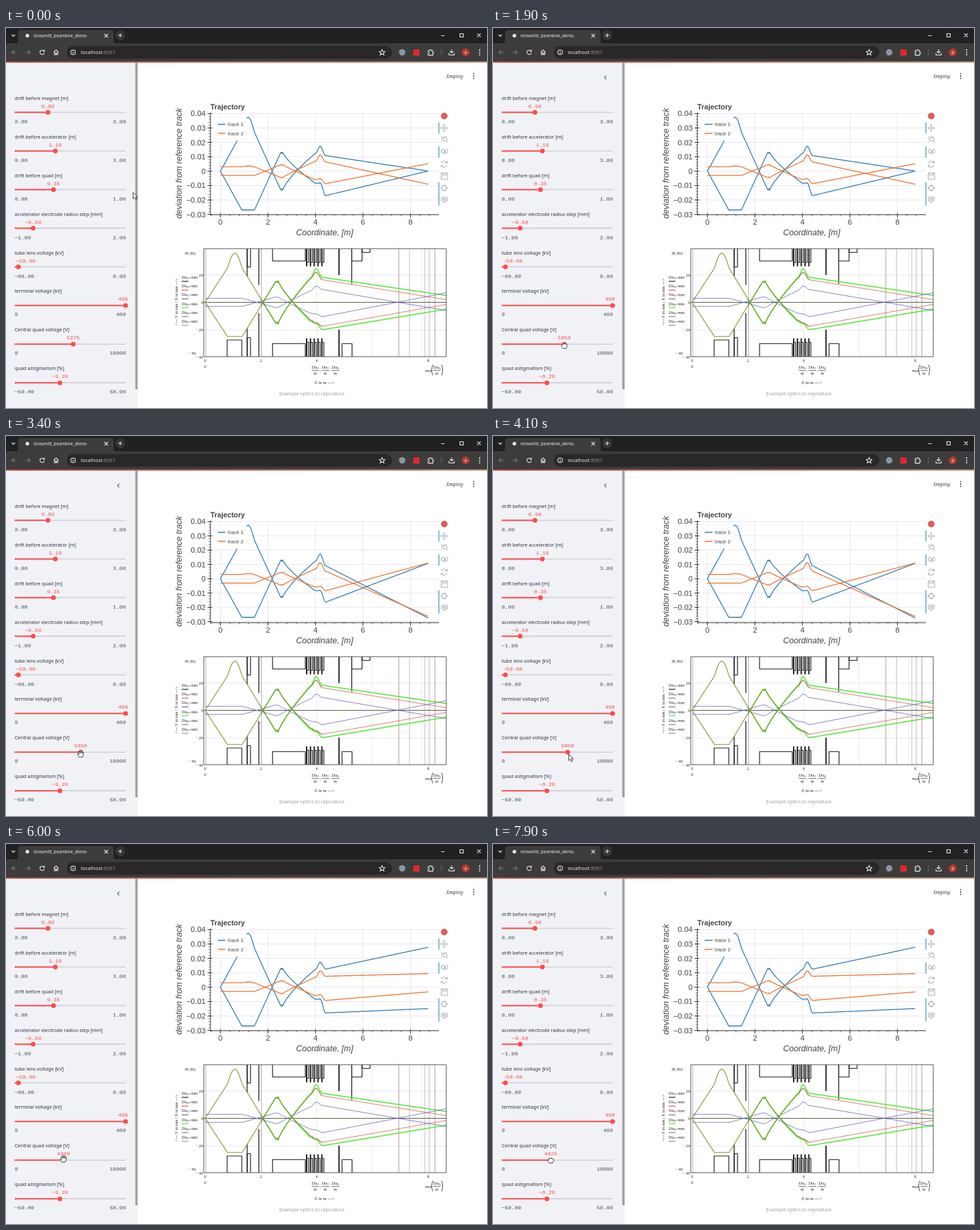
These frames come from a looping animation (720x570 px, 8 s). An HTML page:

```html
<!DOCTYPE html>
<html lang="en">
<head>
<meta charset="utf-8">
<title>Beamline demo</title>
<style>
html, body { margin: 0; width: 100%; height: 100%; overflow: hidden; background: #fff; }
svg { display: block; width: 720px; height: 570px; }
text { font-family: "Noto Sans", sans-serif; fill: #31333f; }
.ln { fill: none; stroke-linejoin: round; }
.ico { fill: none; stroke: #e8e8e8; stroke-width: 1.1; }
.dim { stroke: #7c7c7c; }
.label { font-size: 7.25px; }
.mono { font: 8.1px "Liberation Mono", monospace; fill: #4c4e5a; }
.val { fill: #ff4b4b; text-anchor: middle; }
.plot text { font-family: "Liberation Sans", sans-serif; fill: #444; }
.tool { fill: none; stroke: #a8a8b4; }
.optics text { font: 6.2px "Liberation Serif", serif; fill: #222; }
.mid { text-anchor: middle; }
.end { text-anchor: end; }
</style>
</head>
<body>
<svg viewBox="0 0 720 570">
  <defs>
    <linearGradient id="bar"><stop stop-color="#c8423c"/><stop offset="1" stop-color="#b89070"/></linearGradient>
    <clipPath id="frame"><path d="M296 331H659V493H296z"/></clipPath>
  </defs>

  <g id="browser">
    <rect width="720" height="24" fill="#202122"/>
    <path d="M13 24q5 0 5-5V8q0-5 5-5H156q5 0 5 5v11q0 5 5 5z" fill="#3c3c3c"/>
    <rect y="23" width="720" height="27" fill="#3c3c3c"/>
    <rect x="91" y="27" width="487" height="19" rx="9.5" fill="#282828"/>
    <rect y="50" width="720" height="2" fill="url(#bar)"/>
    <circle cx="32" cy="11.5" r="2.7" fill="#e8e8e8"/>
    <circle cx="171" cy="11" r="7.5" fill="#343434"/>
    <g class="ico">
      <path d="M8.500 10l2.500 2.500 2.500-2.500M147.500 9l5 5m0-5l-5 5M168 11h6m-3-3v6M651.500 11.500h5M679.500 8.500h5v5h-5zM705.500 8.500l5 5m0-5l-5 5"/>
      <path class="dim" d="M16 36.500H9m3-3l-3 3 3 3M29 36.500h7m-3-3l3 3-3 3"/>
      <path d="M56.800 34.500a3.300 3.300 0 1 0 .5 3M57.500 32.500v2.500h-2.500M71.500 36.500l3.500-3.500 3.500 3.500M72.500 36v4h1.800v-2.500h1.500V40h1.700v-4"/>
      <circle cx="100.500" cy="36.500" r="3.500"/><path d="M100.500 36v2.500m0-4v.8"/>
      <path d="M563 32.300l1.200 2.800 3 .3-2.300 2 .8 3-2.700-1.700-2.700 1.700.8-3-2.300-2 3-.3z"/>
      <path d="M632 34h2a1.300 1.300 0 1 1 2.700 0h2v2.200a1.300 1.300 0 1 1 0 2.700v2H632v-2.300a1.200 1.200 0 1 0 0-2.400z"/>
      <path d="M667 32v5.500m-2.500-2.500l2.500 2.500 2.500-2.500M663 37.500v3h8v-3"/>
    </g>
    <path d="M651.500 32v9" stroke="#666"/>
    <circle cx="593" cy="36.500" r="4.800" fill="#8a94a6"/>
    <rect x="609.500" y="32" width="9.500" height="9.500" rx="1" fill="#e0282c"/>
    <circle cx="688" cy="36.500" r="5.800" fill="#c0392b"/>
    <text x="688" y="38.800" class="mid" style="font-size:6.500px;fill:#fff">a</text>
    <text x="41" y="14" style="font-size:6.600px;fill:#eee">streamlit_beamline_demo</text>
    <text x="112" y="39.300" style="font-size:7.700px;fill:#eee">localhost<tspan fill="#999">:8501</tspan></text>
    <path d="M709 32.100v9" stroke="#e8e8e8" stroke-width="1.800" stroke-dasharray="1.800"/>
  </g>

  <rect y="52" width="197" height="518" fill="#f0f2f6"/>
  <rect x="193.500" y="52" width="3.500" height="490" fill="#a0a0a4"/>
  <path id="fold" d="M169.500 71.500l-2.700 2.800 2.700 2.800" class="ln" stroke="#555866" stroke-width="1.100"/>
  <g id="sliders"></g>

  <text x="659.500" y="74.800" style="font-size:7.600px">Deploy</text>
  <path d="M700 67.900v8.500" stroke="#31333f" stroke-width="1.700" stroke-dasharray="1.700"/>

  <g class="plot">
    <g id="chart"></g>
    <path d="M306 127V280H648" fill="none" stroke="#333"/>
    <rect x="311" y="135" width="49.500" height="34" fill="#fff"/>
    <path d="M317 144.500h11.500" stroke="#327cb0" stroke-width="1.500"/>
    <path d="M317 158h11.500" stroke="#ec7430" stroke-width="1.500"/>
    <text x="332" y="147" font-size="7.700">trace 1</text>
    <text x="332" y="160.500" font-size="7.700">trace 2</text>
    <text x="306" y="121.500" font-size="10.800" font-weight="bold">Trajectory</text>
    <text x="477" y="310.500" class="mid" font-size="12.500" font-style="italic">Coordinate, [m]</text>
    <text transform="translate(263 203) rotate(-90)" class="mid" font-size="12.550" font-style="italic">deviation from reference track</text>
    <path d="M648 141.500v17M648 177.500v17M648 231.500v35" stroke="#6aa6c0" stroke-width="1.500"/>
    <circle cx="656" cy="132" r="5" fill="#d8605c"/>
    <g class="tool">
      <path d="M651 150h10M656 145v10M652.500 148.500l-1.500 1.500 1.500 1.500M659.500 148.500l1.500 1.500-1.500 1.500M654.500 146.500l1.500-1.500 1.500 1.500M654.500 153.500l1.500 1.500 1.500-1.500"/>
      <path d="M652 172v-9h9" stroke-dasharray="2 1"/><circle cx="657" cy="167" r="3"/><path d="M659 169l2.500 3"/>
      <circle cx="654" cy="185" r="2.700"/><path d="M656 187l2 3"/><rect x="658" y="182" width="3" height="5.500" rx="1.500"/>
      <path d="M652 203a4.200 4.200 0 0 1 8-1M660 205.500a4.200 4.200 0 0 1-8 1M660.500 199.500v3h-3M651.500 209v-3h3"/>
      <path d="M651.500 217.500h9.500v9.500h-9.500zM653.500 217.500v3h5.500v-3"/>
      <circle cx="656" cy="240" r="4"/><path d="M656 234.500v4m0 3v4M650.500 240h4m3 0h4"/>
      <path d="M652 254h8.500v5.500l-3 .5-1.500 2.500-1.500-2.500-2.500-.5zM653.500 256h5.500m-5.500 2h5.500"/>
    </g>
  </g>

  <g class="optics" id="optics"></g>
  <text x="458" y="550.500" class="mid" style="font-size:7.300px;fill:#9a9ba2">Example optics to reproduce</text>

  <g id="cursor" stroke="#151515" stroke-width=".8" fill="#fff" stroke-linejoin="round">
    <path id="arrow" d="M1.700 1.700v9.500l2.200-2 1.600 3.500 1.700-.7-1.600-3.400h3z"/>
    <path id="open" d="M-2.500 5C-3.500 3-5.500 1-4.800.2-4.200-.5-3.200 0-2.500 1L-3.500-2.500C-3.500-4-2-4-1.700-2.800L-1.200-1V-4C-1.200-5.200.4-5.200.5-4V-1L1.200-3.500C1.600-4.700 3-4.200 2.700-3L2.300-.6 3.200-2C4-3 5-2.200 4.600-1.200L3.400 3.200 2.500 5z"/>
    <path id="grab" d="M-2.300 4.500C-3.500 3-4.800 1.500-4.200.2-3.800-.7-3-.4-2.800-.2V-1.500C-2.600-2.700-1.200-2.700-1-1.800-.8-3 .8-3 1-1.800 1.400-2.700 2.700-2.500 2.700-1.300 3.400-1.900 4.400-1.400 4.300-.4 4.400 1.500 3.400 3 2.800 4.500z"/>
  </g>
</svg>
<script>
const LOOP = 8000, STEP = 100, START_VOLTS = 5275;
const BLUE = '#327cb0', ORANGE = '#ec7430', GRID = '#e6e6f2', INK = '#222';
const $ = id => document.getElementById(id);
const text = (x, y, s, extra = '') => `<text x="${x}" y="${y}" ${extra}>${s}</text>`;
const line = (d, color, w = 1) => `<path class="ln" d="${d}" stroke="${color}" stroke-width="${w}"/>`;
const minus = s => String(s).replace('-', '−');
const lerp = (a, b, u) => a + (b - a) * u;
const smooth = u => u * u * (3 - 2 * u);

// Sidebar
const sliders = [
  ['drift before magnet [m]', '0.00', '3.00', '0.90'],
  ['drift before accelerator [m]', '0.00', '3.00', '1.10'],
  ['drift before quad [m]', '0.00', '1.00', '0.35'],
  ['accelerator electrode radius step [mm]', '-1.00', '2.00', '-0.50'],
  ['tube lens voltage [kV]', '-60.00', '0.00', '-58.00'],
  ['terminal voltage [kV]', '0', '460', '460'],
  ['Central quad voltage [V]', '0', '10000', '5275'],
  ['quad astigmatism [%]', '-50.00', '50.00', '-9.20']
];
const knobX = (value, min, max) => 13 + 166 * (value - min) / (max - min);

function slider([label, min, max, value], i) {
  const y = 126.5 + i * 57.95, x = knobX(value, min, max), half = value.length * 2.43;
  const tx = Math.max(15 + half, Math.min(182.5 - half, x));
  return text(13, y - 18.8, label, 'class="label"') +
    text(tx, y - 6.8, minus(value), 'class="mono val"') +
    line(`M13 ${y}H179`, '#cfd0d8', 1.6) + line(`M13 ${y}H${x}`, '#ff4b4b', 2) +
    `<circle cx="${x}" cy="${y}" r="3.5" fill="#ff4b4b"/>` +
    text(13, y + 16.2, minus(min), 'class="mono"') + text(179.5, y + 16.2, minus(max), 'class="mono end"');
}

function drawSliders(volts) {
  sliders[6][3] = String(volts);
  $('sliders').innerHTML = sliders.map(slider).join('');
}

// Ray height in mm at z metres: drift, magnet, lens, quad, drift
const MAGNET = 0.53, LENS = 2.55, LENS_END = 2.62;
function height(ray, z, kick = 0) {
  const { side, start, wide, lens, hump = 0, power, magnet, quad, entry, peak, exit, end, reach } = ray;
  const out = magnet + MAGNET, top = quad + 0.2, leave = quad + 0.43;
  const part = (a, b) => (z - a) / (b - a);
  if (z < magnet) return side * lerp(start, wide, z / magnet);
  if (z < out) return side * wide + hump * Math.sin(Math.PI * part(magnet, out));
  if (z < LENS) return side * lerp(wide, -lens, part(out, LENS));
  if (z < LENS_END) return -side * lens * (1 - 0.09 * Math.sin(Math.PI * part(LENS, LENS_END)));
  if (z < quad) return lerp(-side * lens, entry, part(LENS_END, quad) ** power);
  if (z < top) return lerp(entry, peak, smooth(part(quad, top)));
  const gone = exit + kick / 16;
  if (z < leave) return lerp(peak, gone, smooth(part(top, leave)));
  return lerp(gone, end + kick, part(leave, reach));
}

function sample(ray, from, to, kick) {
  const n = Math.ceil((to - from) / 0.02);
  return Array.from({ length: n + 1 }, (_, i) => {
    const z = lerp(from, to, i / n);
    return [z, height(ray, z, kick)];
  });
}
const curve = (pts, toX, toY) => 'M' + pts.map(([z, v]) => `${toX(z).toFixed(1)} ${toY(v).toFixed(1)}`).join('L');

// Upper plot
const setup = { magnet: 0.9, quad: 4, reach: 8.75 };
const wideRay = { ...setup, color: BLUE, start: 0, wide: 27, lens: 13.4, power: 0.75 };
const thinRay = { ...setup, color: ORANGE, start: 3, wide: 3, lens: 4.5, power: 0.9 };
const rays = [
  { ...wideRay, side: 1, hump: 10.4, entry: 12.4, peak: 17.3, exit: 10.8, end: 0.1, pull: -36.8, bend: -6 },
  { ...wideRay, side: -1, entry: -8.4, peak: -8.2, exit: -17, end: 0.1, pull: 16.4, bend: -0.8 },
  { ...thinRay, side: 1, hump: 0.6, entry: 6.9, peak: 11.3, exit: 6.4, end: -9.1, pull: -23.6, bend: -2.8 },
  { ...thinRay, side: -1, entry: -5.9, peak: -5.2, exit: -8.7, end: 5.2, pull: 9.1, bend: -0.7 }
];

function drawChart(volts) {
  const d = (volts - START_VOLTS) / 1000;
  const data = rays.map(r => sample(r, 0, r.reach, r.pull * d + r.bend * d * d));
  const all = data.flat().map(p => p[1]), hi = Math.max(...all), span = hi - Math.min(...all);
  const toX = z => 321 + z * 35.55;
  const toY = v => 127 + (hi + span * 0.05 - v) * 153 / (span * 1.1);
  let s = '';
  for (let z = 0; z <= 8; z += 2) {
    s += line(`M${toX(z)} 127V280`, GRID) + line(`M${toX(z)} 277.500V284.500`, '#333') +
      text(toX(z), 294.5, z, 'class="mid" font-size="11.5"');
  }
  for (let z = -0.4; z < 9.2; z += 0.4) s += line(`M${toX(z)} 280v2.500`, '#333', 0.7);
  for (let v = -30; v <= 40; v += 10) {
    s += line(`M306 ${toY(v)}H648`, GRID) + line(`M301.500 ${toY(v)}H308.500`, '#333') +
      text(299, toY(v) + 4.1, minus(v ? (v / 1000).toFixed(2) : 0), 'class="end" font-size="11.5"');
  }
  for (let v = -30; v < 40; v += 2) s += line(`M303.500 ${toY(v)}H306`, '#333', 0.7);
  $('chart').innerHTML = s + data.map((pts, i) => line(curve(pts, toX, toY), rays[i].color, 1.3)).join('');
}

// Lower picture
const AXIS = 411.5;
const model = { magnet: 0.8, quad: 3.78, reach: 8.65, start: 0, wide: 25, lens: 15.8, power: 0.8 };
const upper = { ...model, side: 1, hump: 11, entry: 17.5, peak: 22, exit: 16.5, end: 2 };
const lower = { ...model, side: -1, entry: -13, peak: -15, exit: -17.5, end: -1.5 };
const limes = [
  { ...upper, entry: 18, peak: 24.6, exit: 18.3, end: 5 },
  { ...lower, entry: -14, peak: -15.5, exit: -20, end: -5 }
];
const thin = { ...model, start: 3, wide: 3, lens: 4, power: 0.9 };
const navies = [
  { ...thin, side: 1, entry: 8.5, peak: 11.9, exit: 9.4, end: -6 },
  { ...thin, side: -1, entry: -8, peak: -8.5, exit: -10.5, end: 7 }
];

function electrodes() {
  let s = '';
  for (const side of [-1, 1]) {
    const wall = AXIS + side * 82;
    const box = (a, b, gap) => line(`M${a} ${wall}V${AXIS + side * gap}H${b}V${wall}`, INK, 1.2);
    const rod = (x, gap, w = 1.3) => line(`M${x} ${wall}V${AXIS + side * gap}`, INK, w);
    s += box(399, 448, 62) + rod(361, 39) + box(361, 366, 53) + rod(378.5, side < 0 ? 26 : 16) + rod(498.5, 41, 2);
    for (let x = 450; x < 475; x += 5.7) s += rod(x, 54, 2) + box(x, x + 3, 60);
    s += side < 0 ? rod(517.5, 28) + box(517.5, 533, 62) + box(533, 545, 75) : box(503, 518, 62) + box(331, 353, 56.5);
  }
  return s;
}

function drawOptics() {
  const toX = z => 298 + z * 41.75, toY = v => AXIS - v * 2.05;
  const draw = (set, from, to, color, w) => set.map(r => line(curve(sample(r, from, to), toX, toY), color, w)).join('');
  const rule = (xs, color) => xs.map(x => line(`M${x} 331V493`, color, 0.9)).join('');
  const picture = rule([465, 548, 622, 632], GRID) + line('M296 370.500H659M296 453H659', GRID) +
    rule([299, 382.5], '#b89cb4') + rule([588, 642], '#b08878') + rule([604, 627, 634], '#bcb0b4') +
    line(`M296 ${AXIS}H659`, '#5c5c48', 1.2) + electrodes() +
    draw(limes, 2, 8.65, '#5ce640', 1.6) + draw([upper, lower], 0, 4.2, '#84902c', 1.1) +
    draw([upper, lower], 3.8, 8.65, '#c46450', 0.9) + draw(navies, 0, 8.65, '#6666b4', 0.9);
  let s = `<g clip-path="url(#frame)">${picture}</g><path d="M296 331H659V493H296z" fill="none" stroke="#555"/>`;

  const end = 'class="end"', mid = 'class="mid"';
  s += text(284, 340, '39.302', end) + text(284, 489.5, '− 40', end) + text(295, 496, '− 40', end);
  for (const v of [20, 0, -20]) s += text(295, toY(v) + 2.5, String(v).replace('-', '− '), end);
  for (const z of [0, 2, 4, 8]) s += text(toX(z), 501, z, mid);
  s += text(298, 510, '0', mid);
  const dis = n => `Dis<tspan dy="1" font-size="4.500">${n}</tspan>`;
  [INK, '#c46450', '#6666b4', '#5ce640', '#9c6c9c', '#b08878'].forEach((color, i) => {
    const y = 376 + i * 13.2;
    s += text(263, y, dis((i + 3) % 7) + '<tspan dy="-1">÷mm</tspan>') + line(`M263 ${y + 4}h10`, color, 1.2);
  });
  s += '<text transform="translate(257 411) rotate(-90)" class="mid">&lt;--- Y in mm | X in mm ---&gt;</text>';
  const ratio = (x, n) => text(x, 511, dis(n), mid) + line(`M${x - 5.5} 513.500h11`, '#555', 0.8) + text(x, 520, 'm', mid);
  s += ratio(463, 5) + ratio(478, 7) + ratio(493, 6) + text(470, 515, ',', mid) + text(485.5, 515, ',', mid) +
    text(627.5, 516, 'max') + ratio(645, 0) +
    line('M639 505Q635.500 513 639 521M652 505Q655.500 513 652 521', INK, 0.8) +
    text(477, 533.5, 'Z in m ---&gt;', 'class="mid" style="font-size:6.800px"');
  $('optics').innerHTML = s;
}

// Timeline: [time, value]
const drag = [[0, 5275], [1100, 5275], [1900, 5650], [2700, 5950], [4400, 5950], [5200, 4475], [5500, 4400], [7300, 4400], [7600, 4425], [LOOP, 4425]];
const charted = [[0, START_VOLTS], [3300, 5950], [5900, 4400]];
const hands = [[0, 'arrow'], [900, 'open'], [1000, 'grab'], [2800, 'open'], [3600, 'arrow'], [4300, 'open'], [4400, 'grab'], [5500, 'open'], [7200, 'grab']];

const held = (keys, t) => keys.filter(k => k[0] <= t).pop()[1];
function tween(keys, t) {
  const i = Math.max(1, keys.findIndex(k => k[0] >= t)), a = keys[i - 1], b = keys[i];
  return lerp(a[1], b[1], (t - a[0]) / (b[0] - a[0]));
}

let lastVolts, lastChart;
function show(now) {
  const t = Math.floor(now % LOOP / STEP) * STEP;
  const volts = Math.round(tween(drag, t) / 25) * 25, chart = held(charted, t), hand = held(hands, t);
  if (volts !== lastVolts) drawSliders(lastVolts = volts);
  if (chart !== lastChart) drawChart(lastChart = chart);
  // The pointer arrives, then stays on the knob with a slow sway
  const arrive = smooth(Math.min(1, t / 900));
  const x = lerp(188.5, knobX(volts, 0, 10000), arrive);
  const y = lerp(245, 474.5 + 2.5 * Math.cos((t - 2900) / 7000 * 2 * Math.PI), arrive);
  $('cursor').setAttribute('transform', `translate(${x} ${y})`);
  for (const id of ['arrow', 'open', 'grab']) $(id).style.display = id === hand ? '' : 'none';
  $('fold').style.display = t > 0 ? '' : 'none';
}

drawOptics();
const start = performance.now();
function tick() {
  show(performance.now() - start);
  requestAnimationFrame(tick);
}
tick();
</script>
</body>
</html>
```
